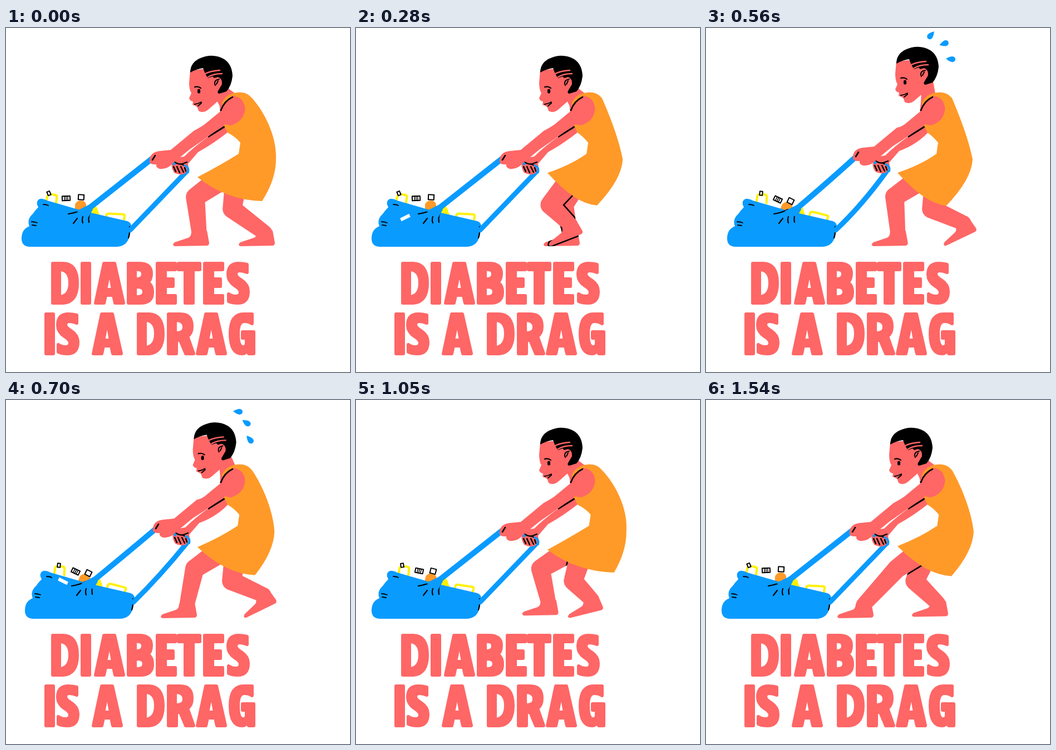
Recreate the animation shown at these times as an HTML page with a canvas. Size 618 by 618 pixels, loop 1.61 s.

```html
<!DOCTYPE html>
<html lang="en">
<head>
<meta charset="utf-8">
<title>Diabetes is a drag</title>
<style>
html, body { margin: 0; width: 100%; height: 100%; overflow: hidden; background: #fff; }
canvas { display: block; }
</style>
</head>
<body>
<canvas id="stage" width="618" height="618" role="img" aria-label="Diabetes is a drag">DIABETES IS A DRAG</canvas>
<script>
const ctx = document.getElementById('stage').getContext('2d');
const SKIN = '#ff6666', ORANGE = '#ff9a29', BLUE = '#0a9bff', YELLOW = '#fff000', BLACK = '#000';
const STEP = 70, STEPS = 23;
const { PI, sin, cos, min, max, hypot } = Math;

// Motion as [step, value] turning points, straight in between
const BAG = [[0, 0], [4, 0], [8, 10], [13, 0]];
const TILT = [[0, 0], [4, 0], [8, 1], [13, 1], [17, 0]];
const HEM = [[0, 460], [4, 433], [8, 432], [13, 470], [22, 441]];
const NEAR_ANKLE = [[0, 347], [4, 385], [8, 463], [13, 463], [22, 283]];
const NEAR_PITCH = [[0, 0], [4, 0.35], [8, 0.43], [13, 0.45], [17, 0]];
const FAR_ANKLE = [[0, 465], [4, 384], [10, 325], [13, 338], [18, 357], [22, 417]];

function follow(track, step) {
  const i = track.findIndex(([s]) => s > step);
  if (i < 0) return track[track.length - 1][1];
  const [s0, v0] = track[i - 1], [s1, v1] = track[i];
  return v0 + (v1 - v0) * (step - s0) / (s1 - s0);
}

const shape = path => path instanceof Path2D ? path : new Path2D(path);

function fill(path, color, rule = 'evenodd') {
  ctx.fillStyle = color;
  ctx.fill(shape(path), rule);
}

function line(path, width = 2.2, color = BLACK) {
  ctx.lineWidth = width;
  ctx.strokeStyle = color;
  ctx.stroke(shape(path));
}

function at(x, y, angle, draw) {
  ctx.save();
  ctx.translate(x, y);
  ctx.rotate(angle);
  draw();
  ctx.restore();
}

// Letters: outline plus a round stroke that softens the corners
const GLYPHS = {
  D: 'M3 3H22Q47 4 47 38T22 74H3ZM15 14V63Q34 62 34 38T15 14Z',
  I: 'M3 3H16V74H3Z',
  A: 'M18 3H37L53 74H38L35 60H21L18 74H3ZM28 15L21 50H34Z',
  B: 'M3 3H22Q44 3 44 21Q44 33 37 37Q46 41 46 55Q46 74 24 74H3ZM15 14V31Q29 32 29 22T15 14ZM15 45V63Q31 64 31 54T15 45Z',
  E: 'M3 3H35V14H17V31H31V44H17V61H35V74H3Z',
  T: 'M3 3H41V14H29V74H15V14H3Z',
  S: 'M37 5Q30 3 22 3Q3 3 3 23Q3 35 15 43Q25 49 25 55Q25 62 17 62Q10 62 4 58V71Q11 74 20 74Q39 74 39 53Q39 41 27 33Q17 27 17 22Q17 16 24 16Q30 16 37 19Z',
  R: 'M3 3H24Q45 3 45 25Q45 38 37 43L48 74H34L24 50H17V74H3ZM15 14V37Q31 38 31 26T15 14Z',
  G: 'M42 3H27Q3 3 3 38Q3 74 24 74Q30 74 34 68L36 74H45V35H25V46H32V56Q32 62 26 62Q17 62 17 38Q17 16 28 16Q36 16 42 20Z'
};

function lettering(text, y, xs) {
  [...text].forEach((ch, i) => at(xs[i], y, 0, () => {
    fill(GLYPHS[ch], SKIN);
    line(GLYPHS[ch], 6, SKIN);
  }));
}

function drawItems(tilt) {
  const box = (w, h) => {
    const d = `M${-w} ${-h}H${w}V${h}H${-w}Z`;
    fill(d, '#fff');
    line(d, 2);
  };
  at(82 + tilt * 8, 306, 0.15 - tilt * 0.1, () => line('M-9 8L-8 -4Q-7 -7 -3 -7H5Q9 -7 9 -3V8', 4, YELLOW));
  at(77 + tilt * 12, 297, -0.4 + tilt * 0.5, () => box(2.5, 3.5));
  at(108 + tilt * 11, 306 + tilt * 2, -0.05 + tilt * 0.5, () => {
    box(7, 4);
    line('M-3 -4V4M0 -4V4M3 -4V4', 1.5);
  });
  at(134 + tilt * 2, 318 + tilt * 3, tilt * 0.4, () => fill('M-10 14V-1Q-7 -8 0 -8Q9 -8 10 0V14Z', ORANGE));
  at(135 + tilt * 7, 304 + tilt * 7, 0.05 + tilt * 0.4, () => box(5, 4.5));
  fill('M148 332L158 321Q162 319 164 324L168 336Z', YELLOW);
  at(196 - tilt * 4, 340 - tilt, 0.05 + tilt * 0.2, () => line('M-16 5V-3Q-15 -6 -11 -6H14Q17 -6 17 -3L16 5', 4, YELLOW));
}

// The white label slides down the bag twice
function drawLabel(step) {
  const slide = (from, to, x, y, angle) => {
    if (step < from || step > to) return;
    const d = 9.5 * (step - from);
    at(x - d, y + d, angle, () => fill('M-9 -3H9V3H-9Z', '#fff'));
  };
  slide(3, 6, 98, 331, -0.46);
  slide(9, 14, 112, 316, 0.46);
}

function drawBag(shift, tilt) {
  at(shift, 0, 0, () => {
    drawItems(tilt);
    fill('M58 322Q52 311 61 307Q66 306 74 310L140 329L218 347Q226 350 225 358L222 374Q217 393 198 393H42Q27 392 28 376Q29 361 42 356Q37 344 48 334Q52 328 58 322Z', BLUE);
    line('M46 348Q51 348 56 350M47 354L54 355M67 317Q73 317 76 319', 1.8);
    line('M112 334Q126 332 137 326M121 351L128 342M138 339Q136 345 138 350M149 349Q147 340 152 330M222 357Q223 368 220 377');
  });
}

function drawFarArm(hand, bag) {
  line(`M${223 + bag} 363Q${274 + bag / 2} ${310 + bag} 324 258`, 9, BLUE);
  at(hand / 3, -hand / 3, 0, () => {
    fill(`M393 172L362 196Q335 216 320 231Q305 232 300 239Q294 248 302 260Q311 265 321 262Q330 252 327 244
      L345 223Q${374 + hand} ${207 + hand / 2} 400 186Z`, SKIN);
    line('M303 241Q311 246 317 244L325 241M316 245L325 249', 2.4);
    line('M301 249L305 258M307 249L312 260M314 249L319 259M321 251L323 257', 2.4);
    line('M298 240L302 244', 5, BLUE);
    line('M321 247Q329 250 327 259', 4, BLUE);
  });
  line('M364 195L393 177', 2.8);
}

function drawNearArm(h, bag) {
  const x = 1.5 * bag;
  line(`M${145 + x} 327Q${206 + bag / 2} ${279 + bag / 2} ${267 + h} ${231 - h / 2}`, 10, BLUE);
  fill(`M${126 + x} 329L${150 + x} 317L${156 + x} 326L${148 + x} 340Z`, BLUE);
  const p = (px, py) => `${px + h} ${py - h}`;
  fill(`M408 122Q428 124 429.5 146Q427 168 404 175L393 173Q368 192 ${p(330, 218)}L${p(302, 241)}
    Q${p(290, 255)} ${p(276, 253)}Q${p(269, 251)} ${p(270, 245)}Q${p(256, 246)} ${p(258, 237)}
    Q${p(259, 223)} ${p(276, 221)}L${p(296, 219)}L${p(337, 185)}Q350 178 357 173L386 149Q396 128 408 122Z`, SKIN);
  line('M386 148Q392 131 407 124', 2.6);
  line(`M${p(263, 237)}L${p(268, 229)}`, 2.6);
}

function drawHead(x, y) {
  fill(`M${376 + x} ${128 + y}L${396 + x} ${106 + y}L412 118L408 140L384 150Q386 138 ${376 + x} ${128 + y}Z`, SKIN);
  at(x, y, 0, () => {
    fill('M331 76L329 98Q329 111 333 117L329 126Q330 131 336 132L335 138Q342 140 344 143L346 149Q355 154 364 146L380 132L396 112L392 70Z', SKIN);
    fill('M331 80Q331 63 347 55Q371 44 392 56Q406 65 407 86Q405 104 396 114L383 118Q379 117 381 113L388 101Q389 91 381 88L374 90L371 87L363 90Q358 84 354 72Q341 74 331 80Z', BLACK);
    line('M358 82Q368 77 384 76M363 88Q373 82 388 82', 2.4, SKIN);
    line('M376 103Q372 94 383 92M381 95L378 101', 2);
    line('M339 106Q345 104 350 108', 2.2);
    line('M346.500 112V115', 5);
    line('M339 137Q346 136 351 133M351 135L345 140', 2);
  });
}

// The whole dress sways with its rear hem
function drawDress(hem) {
  const s = (hem - 446) / 14;
  const rearY = 315 - 4 * s, frontY = 264 + 4 * s, waist = 419 + 2 * s;
  fill(`M388 134Q396 118 414 116Q432 113 442 126C${458 + 6 * s} 150 ${479 + 8 * s} 195 ${482 + 3 * s} 236
    Q${481 + 4 * s} 272 ${hem} ${rearY}Q395 ${rearY - 2} 344 ${frontY}Q386 246 ${waist - 3} 226
    L${waist} 206Q${waist - 9} 195 398 188L391 174Z`, ORANGE);
}

function addLimb(path, [x0, y0, r0], [x1, y1, r1]) {
  const d = hypot(x1 - x0, y1 - y0);
  const nx = (y0 - y1) / d, ny = (x1 - x0) / d;
  path.moveTo(x0 + r0, y0);
  path.arc(x0, y0, r0, 0, 2 * PI);
  path.moveTo(x1 + r1, y1);
  path.arc(x1, y1, r1, 0, 2 * PI);
  path.moveTo(x0 + nx * r0, y0 + ny * r0);
  path.lineTo(x0 - nx * r0, y0 - ny * r0);
  path.lineTo(x1 - nx * r1, y1 - ny * r1);
  path.lineTo(x1 + nx * r1, y1 + ny * r1);
  path.closePath();
}

const FOOT = new Path2D('M14 -8L18 14Q18 19 13 19L-44 20Q-50 18 -44 13L-20 5Q-14 3 -14 -6Z');

// Knee and hip are derived from where the ankle is
function makeLeg(x, pitch, lift, bend) {
  const y = 391 - 46 * sin(pitch) - 19 * cos(pitch) - lift;
  const kneeX = 339 + max(0, x - 345) * 0.56 + bend;
  const kneeY = 303 + 22 * min(1, max(0, (x - 345) / 60));
  const leg = new Path2D();
  addLimb(leg, [374 + (kneeX - 335) * 0.55, 278, 20], [kneeX, kneeY, 17]);
  addLimb(leg, [kneeX, kneeY, 17], [x, y - 4, 13.5]);
  leg.addPath(FOOT, new DOMMatrix().translate(x, y).rotate(-pitch * 180 / PI));
  return leg;
}

function drawLegs(step) {
  const pass = step < 8 ? sin(PI * step / 8) : -sin(PI * max(0, step - 13) / 10);
  const far = makeLeg(follow(FAR_ANKLE, step), 0, 8 * max(0, -pass), 13 * pass);
  const near = makeLeg(follow(NEAR_ANKLE, step), follow(NEAR_PITCH, step), 0, -13 * pass);
  fill(far, SKIN, 'nonzero');
  // the near leg is outlined only where it crosses the far one
  ctx.save();
  ctx.clip(far);
  line(near, 5);
  ctx.restore();
  fill(near, SKIN, 'nonzero');
}

function drawSweat(step) {
  if (step < 8 || step > 11) return;
  const k = (step - 8) / 2;
  const drop = (x, y, angle) => at(x, y, angle, () => fill('M-9 0Q0 -6 4 -5Q8 -4 8 0T3 5Q-2 5 -9 0Z', BLUE));
  drop(404 + 13 * k, 13 + 8 * k, 2.3 - 2.2 * k);
  drop(428 + 4 * k, 28 + 13 * k, -0.3 + 0.9 * k);
  drop(440 - 2 * k, 56 + 15 * k, 0.1 + 0.8 * k);
}

function frame(now) {
  const step = Math.floor(now / STEP) % STEPS;
  const bag = follow(BAG, step), tilt = follow(TILT, step);
  const hand = min(6, bag);
  ctx.fillStyle = '#fff';
  ctx.fillRect(0, 0, 618, 618);
  ctx.lineCap = ctx.lineJoin = 'round';
  drawBag(bag, tilt);
  drawLabel(step);
  drawLegs(step);
  drawFarArm(hand, bag);
  drawHead(1.1 * bag, -1.6 * bag);
  drawDress(follow(HEM, step));
  drawNearArm(hand, bag);
  drawSweat(step);
  lettering('DIABETES', 420, [81, 134, 158, 217, 269, 307, 354, 396]);
  lettering('ISADRAG', 511, [69, 90, 154, 235, 289, 341, 400]);
  requestAnimationFrame(frame);
}
requestAnimationFrame(frame);
</script>
</body>
</html>
```
